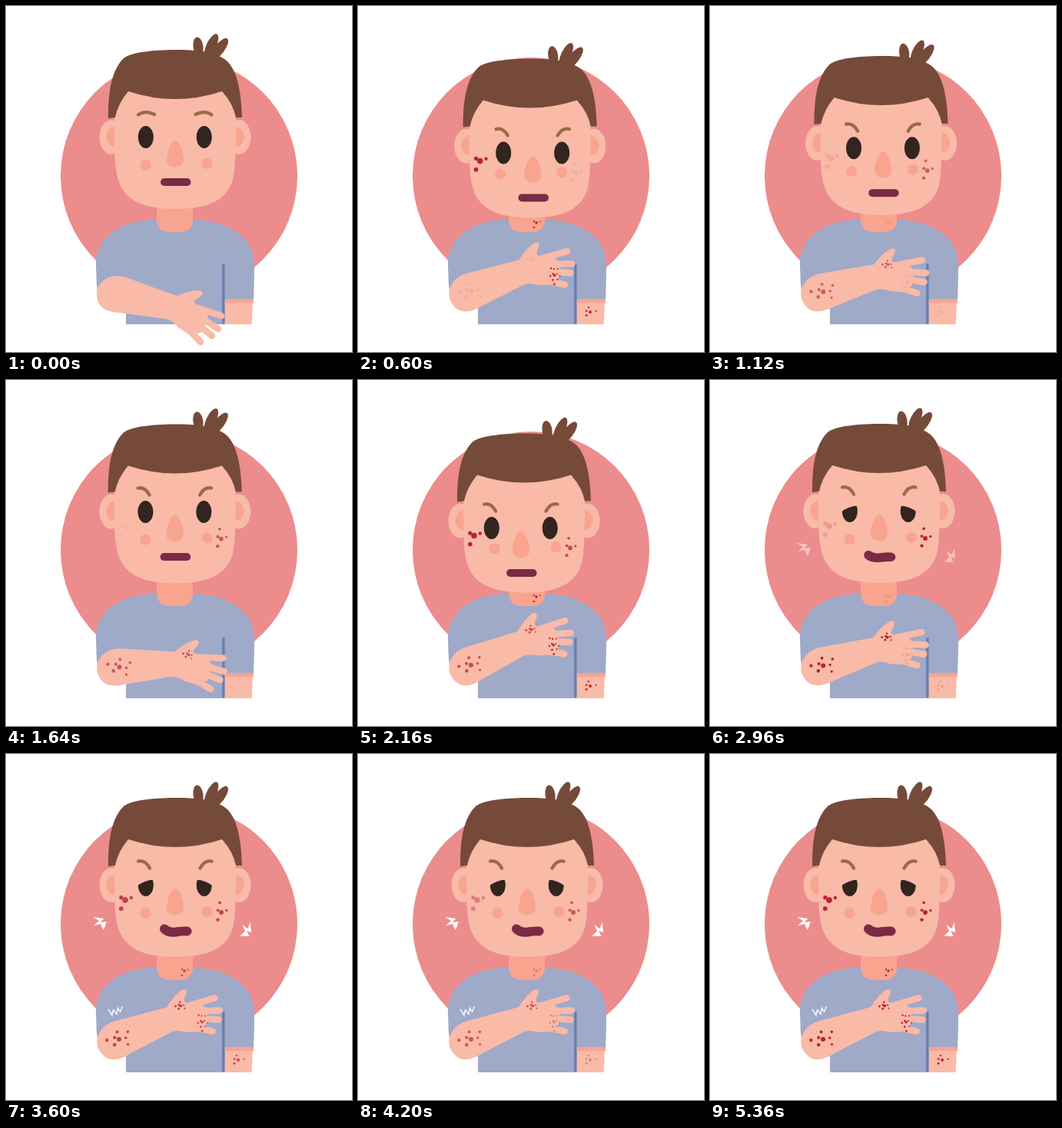
An HTML page that plays this animation: 450 by 450 pixels, repeating every 5.4 s.

```html
<!DOCTYPE html>
<html lang="en">
<head>
<meta charset="utf-8">
<title>Itchy rash</title>
<style>
html, body { margin: 0; width: 100%; height: 100%; overflow: hidden; background: #fff; }
svg { display: block; width: 100vw; height: 100vh; }
.skin { fill: #f9baa8; }
.blush { fill: #f8a48f; }
.hair { fill: #764a39; }
.shirt { fill: #9fa9c8; }
.eye { fill: #32241f; }
.rash { fill: #b8222f; }
.line { fill: none; stroke-linecap: round; }
</style>
</head>
<body>
<svg viewBox="0 0 450 450">
  <circle cx="225" cy="221" r="154" fill="#ec8c8c"/>

  <g id="body">
    <path class="shirt" d="M196 278C165 277 117 290 117 337Q117 360 120 382H156V414H284V382H322Q323 360 323 335C322 290 270 278 243 278Z"/>
    <path class="skin" d="M284 384H321L319.5 414H284Z"/>
    <path class="blush" d="M285 381H322V386H285Z"/>
    <path class="line" d="M282.8 336.5V412" stroke="#6680b0" stroke-width="3.5"/>
    <rect class="blush" x="196" y="250" width="47" height="44" rx="15"/>
  </g>

  <g id="head">
    <g id="ear">
      <ellipse class="skin" cx="137" cy="170.5" rx="15.5" ry="22.5"/>
      <ellipse class="blush" cx="142" cy="170" rx="11.5" ry="13"/>
    </g>
    <use href="#ear" transform="matrix(-1 0 0 1 440 0)"/>
    <path class="skin" d="M141 145C141 180 141 197 143 212C147 249 172 264 220 264C269 264 294 249 297 214C299 195 299 175 299 145L284 100H158Z"/>
    <g class="hair">
      <path d="M133 146C133 118 135 86 153 68C163 59 200 57 222 57C245 57 272 58 288 72C303 88 306 118 307 145H299Q296 128 281 111Q220 131 159 111Q145 128 142 145Z"/>
      <ellipse rx="6.5" ry="12.5" transform="translate(250 53) rotate(-8)"/>
      <ellipse rx="6.5" ry="17" transform="translate(267 52) rotate(25)"/>
      <ellipse rx="6.5" ry="17" transform="translate(277.500 56) rotate(37)"/>
    </g>
    <circle class="blush" cx="181.5" cy="207" r="7"/>
    <circle class="blush" cx="261.5" cy="205" r="7"/>
    <g id="face">
      <g id="eye">
        <ellipse class="eye" cx="181.8" cy="170.5" rx="10" ry="14.5"/>
        <path id="lid" class="skin" d="M169 152H195V163.5Q180 163 169 173Z"/>
        <path id="brow" class="line" stroke="#9a6a4a" stroke-width="4.3"/>
      </g>
      <use href="#eye" transform="matrix(-1 0 0 1 439.500 0)"/>
      <path class="blush" d="M220 175C213 175 209 194 209 200C209 212.500 231 212.500 231 200C231 194 227 175 220 175Z"/>
      <path id="mouth" class="line" stroke="#7a2a43"/>
    </g>
  </g>

  <g id="arm">
    <path class="skin" d="M145 351Q150 351 156 353L222 377Q240 369 252 370Q260 373 251 379Q243 383 246 387L258 393L263 405L259 416L253 425L238 427L224 418Q216 408 208 407L148 399C128 398 118 390 118 375C118 361 130 351 145 351Z"/>
    <path class="line" d="M247 392L280 403M247 401L276 420M242 408L268 429M235 418L253 437" stroke="#f9baa8" stroke-width="8.5"/>
    <g id="raised" transform="rotate(35.4 140 374)"></g>
  </g>

  <g id="bolts" fill="#fff">
    <path id="bolt" d="M-9 -8L5 -6L1 -1L9 -2L5 9L1 1L-8 3L-1 -3Z" transform="translate(122 220)"/>
    <use href="#bolt" transform="translate(312 229) rotate(75) translate(-122 -220)"/>
  </g>
  <path id="elbowBolt" d="M133 332L138 340L139.500 333L144 338L145.500 330.500L148.500 335L151.500 328" fill="none" stroke="#fff" stroke-width="1.8"/>
</svg>
<script>
const LOOP = 5400;
const GOLDEN_ANGLE = 2.4;
const $ = id => document.getElementById(id);
const mix = (a, b, k) => a + (b - a) * k;
const ease = (t, from, to) => {
  const k = Math.min(1, Math.max(0, (t - from) / (to - from)));
  return k * k * (3 - 2 * k);
};
const wave = (t, peak, period) => (1 + Math.cos(2 * Math.PI * (t - peak) / period)) / 2;

// The rash comes in two sets: one flares up and fades, one stays.
const flaring = t => ease(t, 80, 560)
  * mix(0.2 * ease(t, 1640, 2960), 1, wave(t, 650, 1570) ** 2);
const lasting = t => ease(t, 400, 1500) * mix(0.65, 1, wave(t, 2960, 2400));

// A patch is one large dot with smaller ones spiralling around it.
function addPatch(parent, opacity, x, y, rx, ry, count, size) {
  let dots = "";
  for (let i = 0; i < count; i++) {
    const reach = Math.sqrt(i / (count - 1));
    const angle = 1.2 + i * GOLDEN_ANGLE;
    const r = i ? size * (0.5 + 0.3 * (i * 0.618 % 1)) : size;
    dots += `<circle cx="${x + rx * reach * Math.cos(angle)}" cy="${y + ry * reach * Math.sin(angle)}" r="${r}"/>`;
  }
  const node = document.createElementNS("http://www.w3.org/2000/svg", "g");
  node.setAttribute("class", "rash");
  node.innerHTML = dots;
  $(parent).append(node);
  return { node, opacity };
}

const patches = [
  addPatch("head", flaring, 155, 190, 10, 13, 4, 3.8),
  addPatch("body", flaring, 232, 282, 6, 7, 4, 1.7),
  addPatch("body", flaring, 302, 398, 11, 6, 5, 1.9),
  addPatch("raised", flaring, 255, 348, 7, 13, 11, 1.8),
  addPatch("head", lasting, 280, 206, 10, 13, 5, 2.9),
  addPatch("raised", lasting, 227, 327, 7, 6, 7, 2),
  addPatch("raised", lasting, 147, 371, 17, 13, 8, 3)
];

const shift = (id, x, y) => $(id).setAttribute("transform", `translate(${x} ${y})`);

function draw(t) {
  const angry = ease(t, 100, 700);
  const lift = ease(t, 880, 1480);
  const lookRight = angry - lift;
  const lookLeft = ease(t, 1560, 2160) - ease(t, 2360, 2960);
  const turn = lookRight - lookLeft;
  const nod = lookRight + lookLeft;

  // The features travel further than the head, so it seems to turn.
  shift("head", 4 * turn, 12.5 * nod);
  shift("face", 4 * turn, 9.5 * nod);

  const rub = lift - ease(t, 1560, 2160);
  const relax = ease(t, 2360, 2960) - 0.7 * ease(t, 3020, 3620);
  $("arm").setAttribute("transform", `rotate(${-37 * angry + 21.4 * rub + 6.5 * relax} 140 374)`);

  const sad = ease(t, 2360, 2960);
  shift("lid", 0, -17 * (1 - sad));
  $("lid").setAttribute("opacity", Math.min(1, sad * 5));
  $("brow").setAttribute("d",
    `M172 ${mix(141.5, 139.5, angry)}Q181 ${mix(135, 137.5, angry)} ${mix(193, 187, angry)} ${mix(141, 148.5, angry)}`);

  const groan = ease(t, 2360, 3200);
  $("mouth").setAttribute("d",
    `M206 ${229 - 1.5 * groan}Q212 ${229 + 4 * groan} 221 ${229 + 2.5 * groan}T235.500 ${229 + 1.5 * groan}`);
  $("mouth").setAttribute("stroke-width", 10 + 2 * groan);

  $("bolts").setAttribute("opacity", ease(t, 2720, 3220));
  $("elbowBolt").setAttribute("opacity", 0.8 * ease(t, 2960, 3460));
  for (const { node, opacity } of patches) node.setAttribute("opacity", opacity(t));
}

const start = performance.now();
function tick() {
  draw((performance.now() - start) % LOOP);
  requestAnimationFrame(tick);
}
draw(0);
requestAnimationFrame(tick);
</script>
</body>
</html>
```
